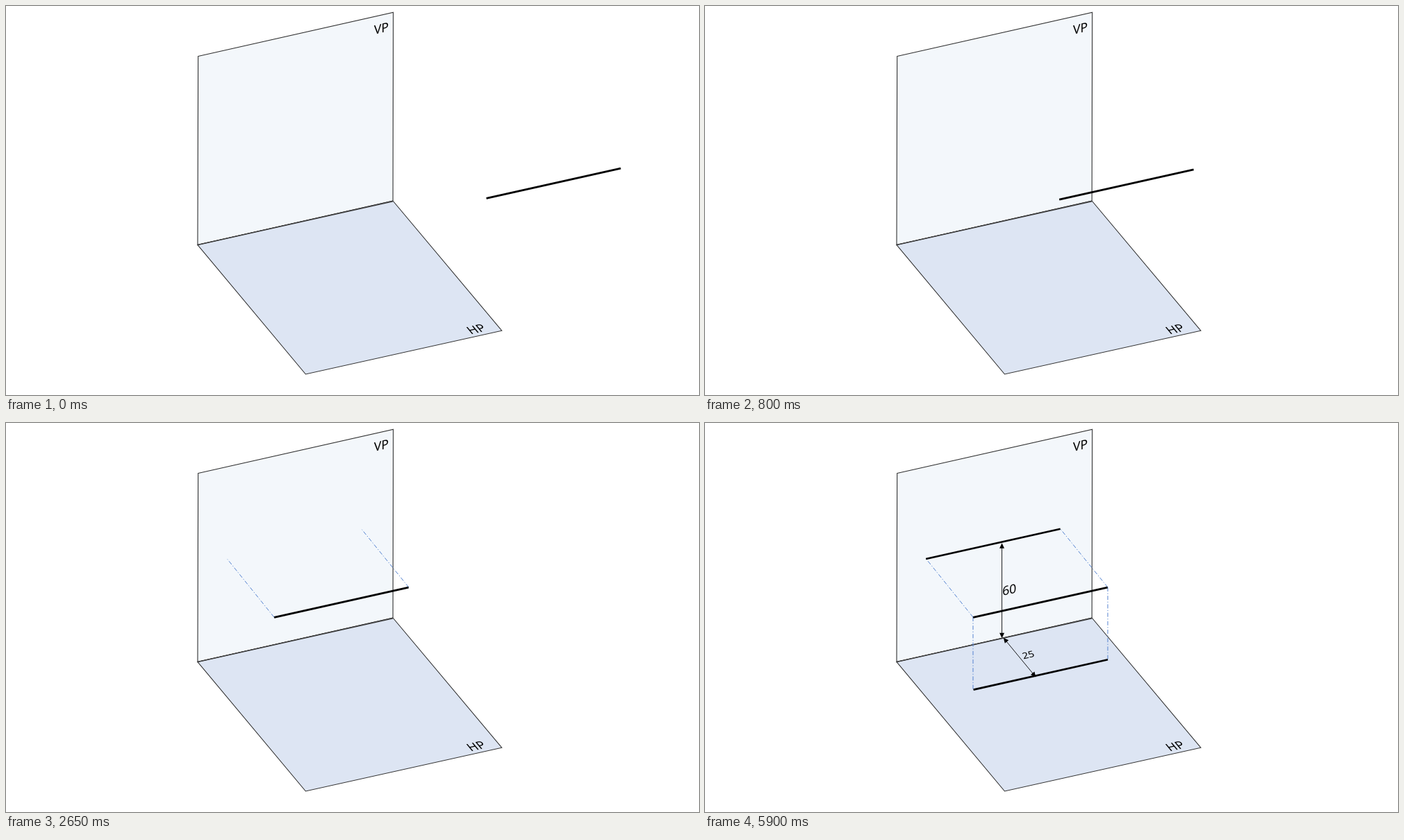
These frames come from a looping animation (998 by 561 pixels, 5940 ms). An HTML page with a canvas:

```html
<!DOCTYPE html>
<html lang="en">
<head>
<meta charset="utf-8">
<title>Line parallel to both planes</title>
<style>
html, body { margin: 0; width: 100%; height: 100%; overflow: hidden; background: #fff; }
canvas { display: block; }
</style>
</head>
<body>
<canvas id="stage" width="998" height="561"></canvas>
<script>
const ctx = document.getElementById('stage').getContext('2d');
const LOOP = 5940;
const SOFT = 0.2; // soft edge of a wipe, as a share of its length

const clamp = v => Math.min(1, Math.max(0, v));
const progress = (t, start, length) => clamp((t - start) / length);
const ease = u => u * u * u * (u * (6 * u - 15) + 10);

function polygon(points, fill, stroke) {
  ctx.beginPath();
  points.forEach(([x, y]) => ctx.lineTo(x, y));
  ctx.closePath();
  ctx.fillStyle = fill;
  ctx.fill();
  if (stroke) {
    ctx.strokeStyle = stroke;
    ctx.lineWidth = 1.1;
    ctx.stroke();
  }
}

function line(x1, y1, x2, y2, width, color, dash = []) {
  ctx.beginPath();
  ctx.moveTo(x1, y1);
  ctx.lineTo(x2, y2);
  ctx.setLineDash(dash);
  ctx.lineWidth = width;
  ctx.strokeStyle = color;
  ctx.stroke();
  ctx.setLineDash([]);
}

const bar = (x, y) => line(x, y, x + 193.5, y - 43.3, 2.7, '#000');

// Paint that is revealed from the first point towards the second
function wipe(x1, y1, x2, y2, rgb, p) {
  const head = p * (1 + SOFT), tail = head - SOFT;
  const alpha = pos => clamp((head - pos) / SOFT);
  const paint = ctx.createLinearGradient(x1, y1, x2, y2);
  [0, clamp(tail), clamp(head), 1].forEach(pos =>
    paint.addColorStop(pos, `rgba(${rgb},${alpha(pos)})`));
  return paint;
}

function projector(x1, y1, x2, y2, p) {
  if (p > 0) line(x1, y1, x2, y2, 1, wipe(x1, y1, x2, y2, '84,130,208', p), [6, 2.5, 1.2, 2.5]);
}

function arrow(x1, y1, x2, y2, p) {
  if (p <= 0) return;
  const paint = wipe(x1, y1, x2, y2, '0,0,0', p);
  const len = Math.hypot(x2 - x1, y2 - y1);
  const ux = (x2 - x1) / len, uy = (y2 - y1) / len;
  line(x1 + ux * 5, y1 + uy * 5, x2 - ux * 5, y2 - uy * 5, 0.9, paint);
  for (const [x, y, s] of [[x1, y1, 7.5], [x2, y2, -7.5]]) {
    const bx = x + ux * s, by = y + uy * s;
    polygon([[x, y], [bx - uy * 3.5, by + ux * 3.5], [bx + uy * 3.5, by - ux * 3.5]], paint);
  }
}

// Text lying in a plane: its up-down axis runs along (vx, vy)
function label(text, x, y, size, vx, vy) {
  ctx.save();
  ctx.transform(0.976, -0.22, vx, vy, x, y);
  ctx.font = `${size}px "Noto Sans", "Open Sans", sans-serif`;
  ctx.fillStyle = '#000';
  ctx.fillText(text, 0, 0);
  ctx.restore();
}

function planes() {
  const left = [276, 344.5], right = [557.2, 281];
  polygon([[276.7, 72.5], [557.7, 9.3], right, left], '#f3f7fb', '#303030');
  polygon([left, right, [714, 468.2], [431.5, 531]], '#dde5f3', '#303030');
  line(...left, 557.2, 281.8, 1.3, '#404040');
  label('VP', 530, 41, 18, 0, 1);
  label('HP', 669.5, 473.5, 18, 0.64, 0.77);
}

function draw(t) {
  ctx.fillStyle = '#fff';
  ctx.fillRect(0, 0, 998, 561);
  planes();

  const toWall = progress(t, 1750, 950);
  projector(386, 280, 318.5, 196, toWall);
  projector(580, 237, 512, 153, toWall);
  if (t >= 2730) bar(318.2, 196);

  const toFloor = progress(t, 2960, 950);
  projector(386, 280, 386, 384.5, toFloor);
  projector(580, 237, 580, 341, toFloor);
  if (t >= 3940) bar(386.6, 384.6);

  const move = ease(progress(t, 34, 1393));
  bar(691.8 - 305.6 * move, 277.4 + 3 * move);

  arrow(427.6, 310.3, 427.6, 173.3, progress(t, 3930, 930));
  if (t >= 4870) label('60', 428.3, 249, 18, 0, 1);
  arrow(429.8, 309.8, 476.5, 366.5, progress(t, 4870, 930));
  if (t >= 5800) label('25', 458.7, 340.5, 15, 0.3, 0.8);
}

function tick() {
  draw(performance.now() % LOOP);
  requestAnimationFrame(tick);
}
tick();
</script>
</body>
</html>
```
